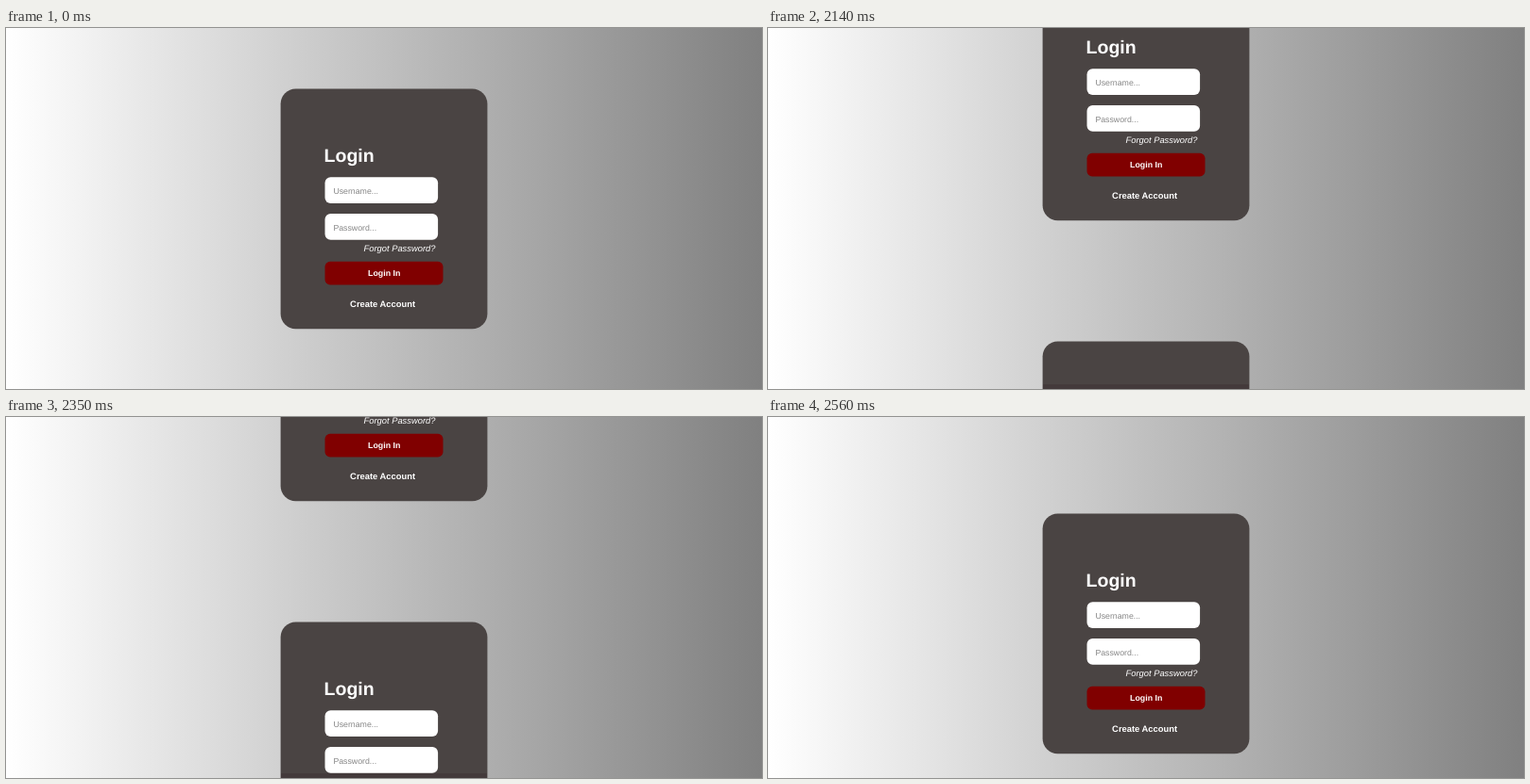
An HTML page that plays this animation: 800x383 px, repeating every 2630 ms.

```html
<!DOCTYPE html>
<html lang="en">
<head>
<meta charset="utf-8">
<title>Login card</title>
<style>
  html, body { margin: 0; width: 100%; height: 100%; overflow: hidden; }
  body { background: linear-gradient(to right, #fff, #808080); }
  svg { display: block; width: 100%; height: 100%; }
  text {
    font-family: "Liberation Sans", Arial, sans-serif;
    text-rendering: geometricPrecision;
    fill: #fff;
  }
  .title { font-size: 19.5px; font-weight: bold; }
  .hint { font-size: 8.75px; fill: #858585; }
  .forgot { font-size: 9.35px; font-style: italic; }
  .button { font-size: 8.8px; font-weight: bold; text-anchor: middle; }
  .create { font-size: 9.4px; font-weight: bold; text-anchor: middle; }
</style>
</head>
<body>
<svg viewBox="0 0 800 383">
  <g id="strip">
    <g id="card">
      <rect x="290.6" y="64.5" width="218.8" height="254.8" rx="16" fill="#4a4443"/>
      <text class="title" x="336.6" y="141.5">Login</text>
      <rect x="337.5" y="158.2" width="119.6" height="27.8" rx="6" fill="#fff"/>
      <text class="hint" x="346.4" y="175.8">Username...</text>
      <rect x="337.5" y="197" width="119.6" height="27.8" rx="6" fill="#fff"/>
      <text class="hint" x="346.4" y="214.5">Password...</text>
      <text class="forgot" x="378.6" y="236.8">Forgot Password?</text>
      <rect x="337.5" y="247.8" width="125" height="24.6" rx="5.5" fill="#800000"/>
      <text class="button" x="400.2" y="263.2">Login In</text>
      <text class="create" x="398.6" y="296.2">Create Account</text>
    </g>
    <use href="#card" y="383"/>
  </g>
  <rect id="shade" x="291" y="378" width="218" height="5" fill="#281419" opacity=".2"/>
</svg>
<script>
  const HOLD = 2000, STEP = 70, STEPS = 10, HEIGHT = 383;
  const LOOP = HOLD + STEP * (STEPS - 1);
  const strip = document.getElementById("strip");
  const shade = document.getElementById("shade");
  const start = performance.now();

  // The page rests, then scrolls up by one screen height in equal steps.
  function draw(now) {
    const time = Math.max(0, now - start) % LOOP;
    const step = time < HOLD ? 0 : 1 + Math.floor((time - HOLD) / STEP);
    const offset = Math.round(HEIGHT * step / STEPS);
    strip.setAttribute("transform", `translate(0 ${-offset})`);
    shade.setAttribute("visibility", step > 1 && step < 9 ? "visible" : "hidden");
    requestAnimationFrame(draw);
  }
  draw(start);
</script>
</body>
</html>
```
